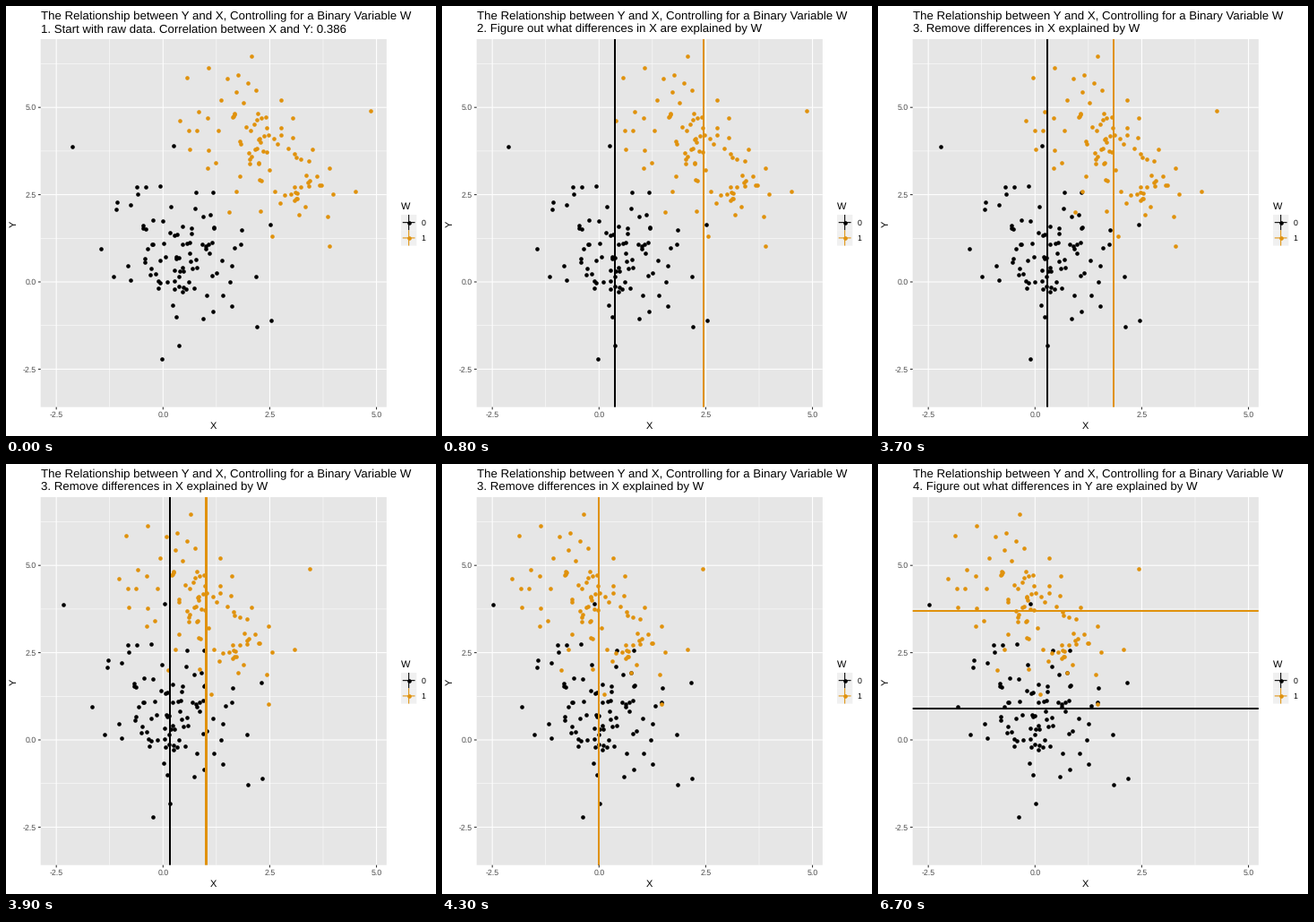
These frames come from a looping animation (480 px wide and 480 px high, 8000 ms). A matplotlib script:

```python
import math

import matplotlib.pyplot as plt
import numpy as np
from matplotlib.animation import FuncAnimation
from matplotlib.patches import Rectangle

SIZE, DPI = 480, 72
STEP_MS, LOOP_MS = 100, 8000
LEFT, RIGHT, TOP, BOTTOM = 38.7, 424.8, 37.0, 447.7
ZERO_X, ZERO_Y, UNIT_X, UNIT_Y = 175.3, 308.0, 47.65, 38.96
COLORS = ("#000000", "#E0920D")
MEAN_X, MEAN_Y = (0.371, 2.449), (0.898, 3.708)

TITLE = "The Relationship between Y and X, Controlling for a Binary Variable W"
STEPS = (
    (0, "1. Start with raw data. Correlation between X and Y: 0.386"),
    (500, "2. Figure out what differences in X are explained by W"),
    (3500, "3. Remove differences in X explained by W"),
    (6400, "4. Figure out what differences in Y are explained by W"),
)

plt.rcParams.update({
    "font.family": "Liberation Sans",
    "text.hinting": "none",
    "path.snap": False,
})


def px(value):
    return ZERO_X + UNIT_X * value


def py(value):
    return ZERO_Y - UNIT_Y * value


def cloud(edge, count, center, axes, angle, seed):
    """Outlying points plus a random fill of a tilted ellipse."""
    rng = np.random.default_rng(seed)
    radius = np.sqrt(rng.random(count))
    theta = rng.random(count) * 2 * math.pi
    u, v = axes[0] * radius * np.cos(theta), axes[1] * radius * np.sin(theta)
    c, s = math.cos(angle), math.sin(angle)
    core = np.column_stack((center[0] + c * u - s * v, center[1] + s * u + c * v))
    return np.vstack((edge, core)) + (0.2, 0.2)


EDGE_0 = [
    (74, 157), (187, 156), (146, 202), (172, 201), (156, 202), (147, 210),
    (124, 219), (123, 227), (139, 222), (106, 271), (120, 302), (136, 290),
    (139, 306), (153, 245), (161, 300), (174, 394), (193, 379), (190, 347),
    (186, 334), (212, 208), (231, 208), (228, 233), (232, 247), (263, 250),
    (262, 266), (255, 270), (252, 290), (250, 308), (279, 302), (295, 244),
    (296, 351), (280, 358), (252, 335), (242, 323), (231, 341), (220, 349),
]
EDGE_1 = [
    (407, 117), (390, 207), (365, 210), (361, 268), (361, 181), (342, 160),
    (274, 56), (226, 69), (202, 80), (259, 77), (247, 81), (270, 86),
    (279, 94), (257, 96), (307, 105), (240, 105), (265, 108), (215, 118),
    (194, 128), (225, 125), (204, 139), (213, 139), (237, 139), (205, 160),
    (226, 161), (234, 175), (225, 181), (320, 125), (261, 190), (257, 207),
    (249, 230), (284, 229), (306, 220), (297, 257), (327, 233), (359, 235),
]
GROUPS = (
    cloud(EDGE_0, 62, (196, 275), (57, 46), 1.35, 11),
    cloud(EDGE_1, 60, (301, 170), (69, 30), 0.82, 4),
)

fig = plt.figure(figsize=(SIZE / DPI, SIZE / DPI), dpi=DPI, facecolor="white")
ax = fig.add_axes((0, 0, 1, 1))
ax.set(xlim=(0, SIZE), ylim=(SIZE, 0))
ax.axis("off")


def box(x0, y0, x1, y1, color, zorder):
    return ax.add_patch(Rectangle((x0, y0), x1 - x0, y1 - y0, facecolor=color,
                                  linewidth=0, zorder=zorder))


def line(x0, y0, x1, y1, color, width=1.07, zorder=2):
    ax.plot((x0, x1), (y0, y1), color=color, lw=width, zorder=zorder,
            solid_capstyle="butt")


def label(x, y, text, size, color="black", **kw):
    return ax.text(x, y, text, fontsize=size, color=color, **kw)


def dots(points, color):
    return ax.scatter(*np.transpose(points), s=21.2, color=color,
                      linewidths=0, zorder=3)


def draw_panel():
    box(LEFT, TOP, RIGHT, BOTTOM, "#E6E6E6", 1)
    for value in np.arange(-2.5, 6.5, 1.25):
        major = value % 2.5 == 0
        width = 1.07 if major else 0.53
        x, y = px(value), py(value)
        if value <= 5:
            line(x, TOP, x, BOTTOM, "white", width)
        line(LEFT, y, RIGHT, y, "white", width)
        if major:
            line(x, BOTTOM, x, BOTTOM + 2.75, "#333333")
            line(LEFT - 2.75, y, LEFT, y, "#333333")
            label(x, 459.2, f"{value:.1f}", 8.8, "#4D4D4D", ha="center")
            label(34, y + 3.2, f"{value:.1f}", 8.8, "#4D4D4D", ha="right")
    label(231.8, 472, "X", 11, ha="center")
    label(9, 243, "Y", 11, ha="center", va="center", rotation=90)
    label(38.7, 15.3, TITLE, 13.2)


def draw_legend():
    label(441, 226.8, "W", 11)
    for i, color in enumerate(COLORS):
        top = 233 + 17.28 * i
        mid = top + 8.64
        box(441, top, 458.28, top + 17.28, "#F0F0F0", 1)
        line(449.64, top, 449.64, top + 17.28, color, zorder=4)
        line(442.73, mid, 456.55, mid, color, zorder=4)
        dots([(449.64, mid)], color)
        label(463.8, mid + 3.2, str(i), 8.8)


draw_panel()
draw_legend()
subtitle = label(38.7, 29.7, "", 13.2)
scatters = [dots(points, color) for points, color in zip(GROUPS, COLORS)]
bars = [box(0, 0, 0, 0, color, 4) for color in COLORS]


def stroke(center):
    """Whole pixels touched by a thin line: start and thickness."""
    start = math.floor(center - 0.535)
    return start, math.ceil(center + 0.535) - start


def update(frame):
    t = frame * STEP_MS
    subtitle.set_text([text for start, text in STEPS if t >= start][-1])
    progress = min(max((t - 3400) / 900, 0), 1)
    eased = (1 - math.cos(math.pi * progress)) / 2

    for i, bar in enumerate(bars):
        shift = MEAN_X[i] * eased
        scatters[i].set_offsets(GROUPS[i] - (UNIT_X * shift, 0))
        bar.set_visible(800 <= t < 6400 or t >= 6700)
        if t < 6400:
            x, width = stroke(px(MEAN_X[i] - shift))
            bar.set_bounds(x, TOP, width, BOTTOM - TOP)
        else:
            y, height = stroke(py(MEAN_Y[i]))
            bar.set_bounds(LEFT, y, RIGHT - LEFT, height)
    return [subtitle, *scatters, *bars]


animation = FuncAnimation(fig, update, frames=LOOP_MS // STEP_MS,
                          interval=STEP_MS, repeat=True, repeat_delay=0)
plt.show()
```
